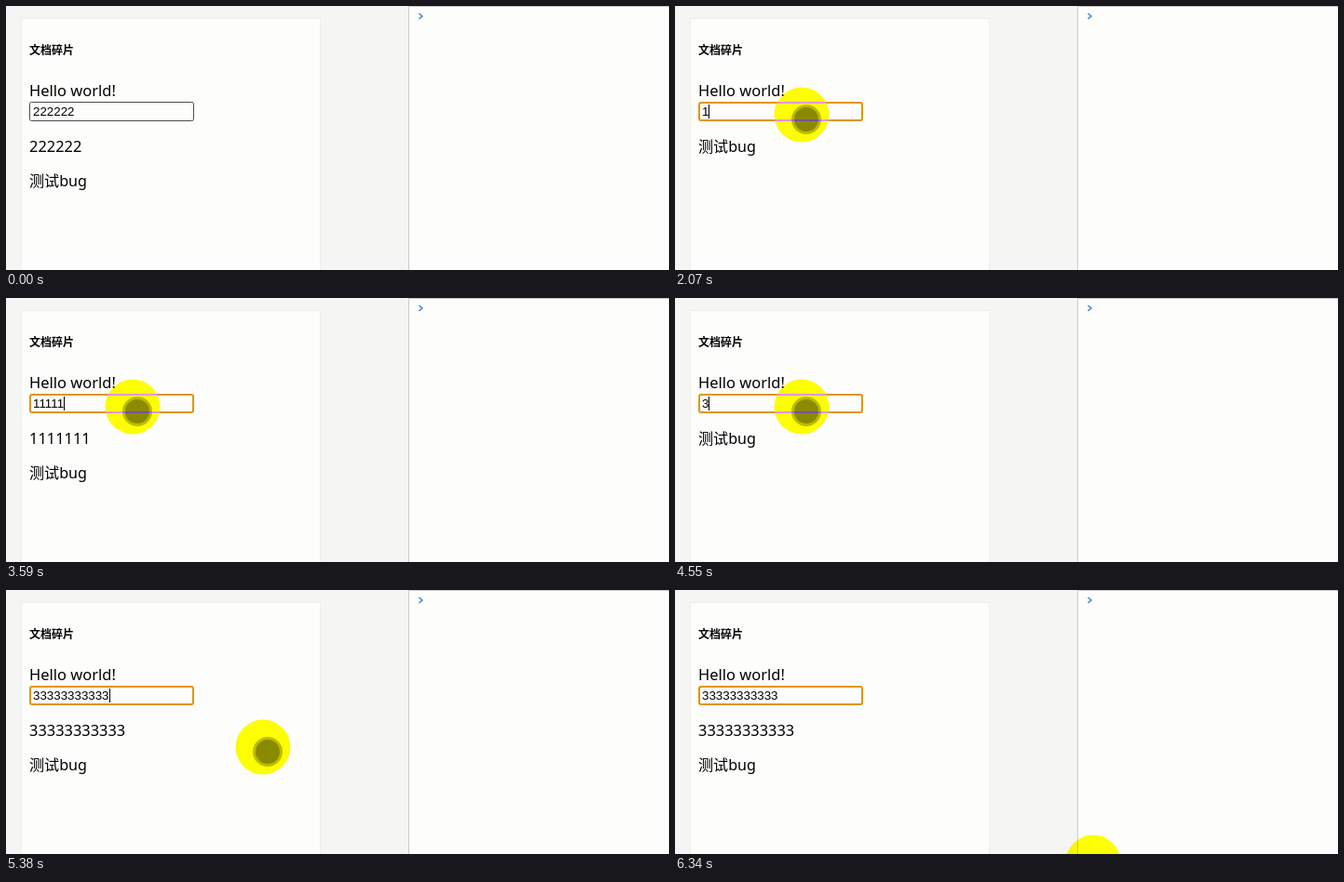
These frames come from a looping animation (712 by 284 pixels, 6.47 s). An HTML page:

```html
<!DOCTYPE html>
<html lang="zh-CN">
<head>
<meta charset="utf-8">
<title>文档碎片</title>
<style>
  html, body { margin: 0; width: 100%; height: 100%; overflow: hidden; background: #f5f5f3; }
  svg { display: block; width: 712px; height: 284px; }
  text { font: 16.4px "Noto Sans", "Noto Sans CJK SC", "Noto Sans CJK", sans-serif; }
  #title { font: bold 12px "Noto Sans CJK SC", "Noto Sans CJK", sans-serif; }
  #note { font-size: 16.1px; }
  #value { font: 13.333px "Liberation Sans", Arial, sans-serif; }
  #halo { fill: #00f; mix-blend-mode: difference; }
</style>
</head>
<body>
<svg viewBox="0 0 712 284">
  <rect width="712" height="284" fill="#f5f5f3"/>
  <rect x="16.5" y="13.5" width="321" height="300" fill="#fdfdfc" stroke="#eeeeea"/>
  <rect x="432.5" y="0.5" width="300" height="300" fill="#fdfdfc" stroke="#cccccc"/>
  <path d="M443.5 8 L447 11 L443.5 14" fill="none" stroke="#3f84d4" stroke-width="1.5"/>

  <text id="title" x="25" y="52">文档碎片</text>
  <text x="25" y="97" style="font-size: 16.5px">Hello world!</text>
  <rect id="field" rx="2" fill="#fdfdfc"/>
  <text id="echo" x="25" y="157"></text>
  <text id="note" x="25">测试bug</text>
  <text id="value" x="29" y="118"></text>
  <rect id="caret" y="106" width="1" height="15"/>

  <circle id="halo" r="29.5"/>
  <g id="core">
    <circle r="16" opacity="0.26"/>
    <circle r="13" opacity="0.26"/>
  </g>
</svg>
<script>
const LOOP = 6470;
const HOME = [136, 117];
const ones = '1'.repeat(7), threes = '3'.repeat(11);

// start ms, field value, echoed value, pointer centre, caret visible
const steps = [
  [0, '222222', '222222', null, false],
  [280, '222222', '222222', HOME, true],
  [830, '22222', '222222', HOME, true],
  [1380, '1', '', HOME, true],
  [2340, '111111', '', HOME, true],
  [2620, ones, ones, HOME, true],
  [2900, '111111', ones, HOME, true],
  [3590, '11111', ones, HOME, true],
  [3720, '1', ones, HOME, true],
  [3860, '3', '', HOME, true],
  [4690, '333333', '', HOME, true],
  [4830, threes, threes, HOME, true],
  [5380, threes, threes, [276, 169], true],
  [6070, threes, threes, [386, 236], true],
  [6210, threes, threes, [441, 251], false],
  [6340, threes, threes, [449, 293], false]
];

const el = id => document.getElementById(id);
const set = (id, attrs) => {
  for (const name in attrs) el(id).setAttribute(name, attrs[name]);
};
const show = (id, on) => set(id, { visibility: on ? 'visible' : 'hidden' });

function draw([, value, echo, pointer, caret]) {
  el('value').textContent = value;
  el('echo').textContent = echo;
  set('note', { y: echo ? 194 : 157 });

  set('field', pointer
    ? { x: 26, y: 104, width: 175, height: 19, stroke: '#e09600', 'stroke-width': 2 }
    : { x: 25.5, y: 103.5, width: 176, height: 20, stroke: '#4a4a4a', 'stroke-width': 1 });

  show('halo', pointer);
  show('core', pointer && pointer[1] < 284);
  if (pointer) {
    const [x, y] = pointer;
    set('halo', { cx: x, cy: y });
    set('core', { transform: `translate(${x + 5} ${y + 5})` });
  }

  show('caret', caret);
  set('caret', { x: Math.round(29 + el('value').getComputedTextLength()) });
}

const start = performance.now();
let current;
function tick() {
  const time = Math.max(0, performance.now() - start) % LOOP;
  const step = steps.findLast(([from]) => from <= time);
  if (step !== current) draw(current = step);
  requestAnimationFrame(tick);
}
tick();
</script>
</body>
</html>
```
